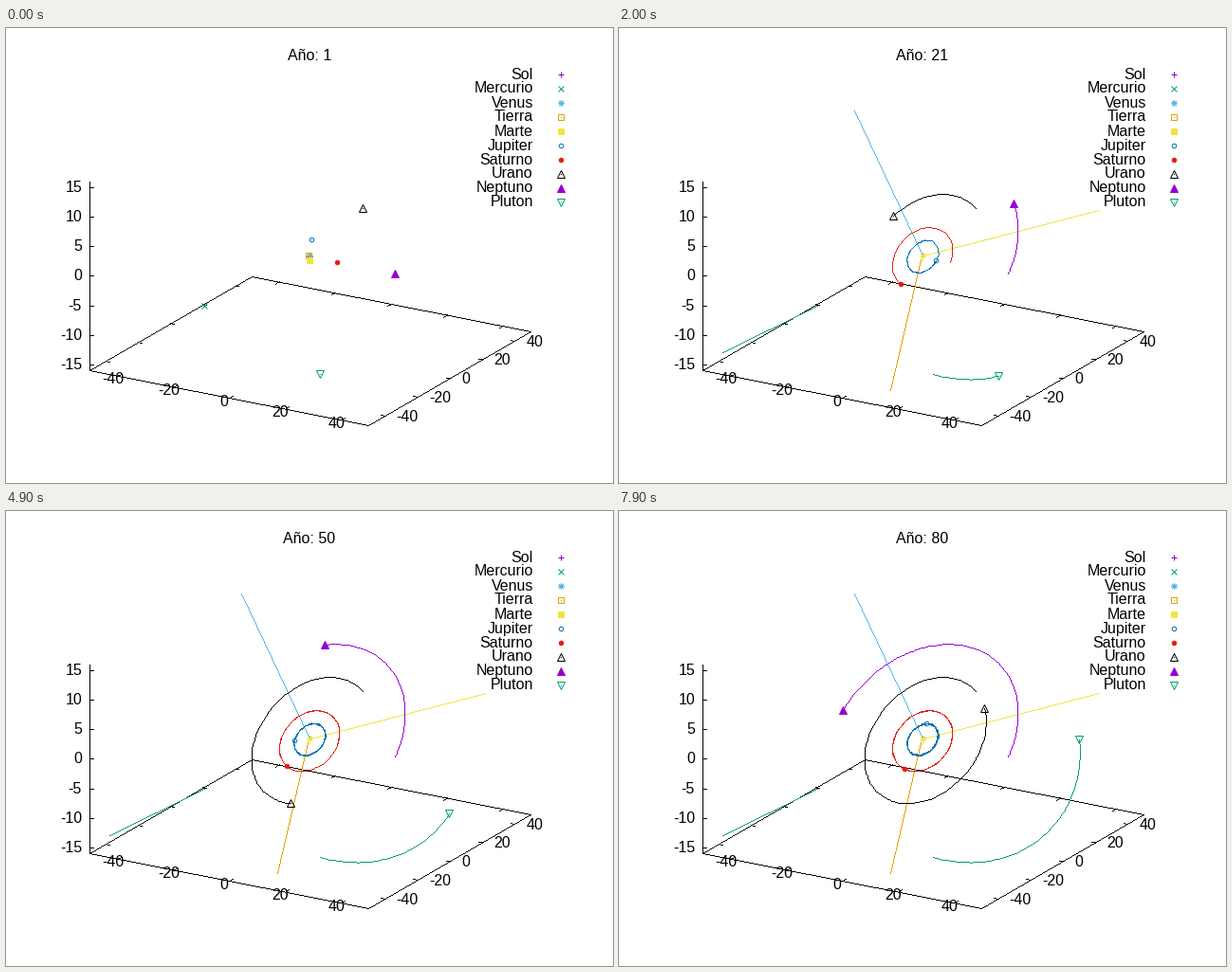
Write a matplotlib script that moves like this. It is 640 by 480 pixels and loops after 8 s.

```python
import numpy as np
import matplotlib.pyplot as plt
from matplotlib.animation import FuncAnimation

W, H, DPI = 640, 480, 100
YEARS = 80
PX = 72 / DPI
CENTER = np.array([320.3, 240.7])
FLOOR = -16
# Offsets that centre a marker, or a one-pixel dot, on a whole pixel
MARK, DOT = np.array([-0.5, -0.5]), np.array([-0.5, 0.5])

plt.rcParams["font.family"] = "Liberation Sans"
fig = plt.figure(figsize=(W / DPI, H / DPI), dpi=DPI, facecolor="white")
ax = fig.add_axes([0, 0, 1, 1])
ax.set_xlim(-0.5, W - 0.5)
ax.set_ylim(H - 0.5, -0.5)
ax.axis("off")


def project(x, y, z):
    """Orthographic view of the 3D box, in pixels."""
    sx = CENTER[0] + 2.945 * x + 1.71 * y
    sy = CENTER[1] + 0.58 * x - 0.995 * y - 6.23 * z
    return np.array([sx, sy])


def trace(points):
    """Hard-edged pixels along a polyline, and their count at each vertex."""
    pts = np.round(points)
    runs = [pts[:1]]
    for p, q in zip(pts[:-1], pts[1:]):
        n = int(np.abs(q - p).max())
        runs.append(np.round(np.linspace(p, q, n + 1)[1:]))
    return np.vstack(runs) + DOT, np.cumsum([len(r) for r in runs])


def dots(xy, color="black"):
    return ax.plot(*xy.T, ",", color=color)[0]


def line(*points):
    dots(trace(points)[0])


def label(x, y, s, ha):
    return ax.text(x, y, s, ha=ha, va="baseline", size=16 * PX, color="black")


def orbit(a, decay, e, incl, node, peri, lon, rate, accel):
    """Yearly screen positions of a Kepler orbit, seen in equatorial axes."""
    t = np.arange(YEARS)
    node, incl = np.radians([node, incl])
    m = np.radians(lon + rate * t + accel * t**2 - peri)
    ecc = m + e * np.sin(m)
    for _ in range(6):
        ecc -= (ecc - e * np.sin(ecc) - m) / (1 - e * np.cos(ecc))
    r = (a - decay * t) * (1 - e * np.cos(ecc))
    nu = 2 * np.arctan2(np.sqrt(1 + e) * np.sin(ecc / 2),
                        np.sqrt(1 - e) * np.cos(ecc / 2))
    u = nu + np.radians(peri) - node
    p, q = r * np.cos(u), r * np.sin(u) * np.cos(incl)
    x = p * np.cos(node) - q * np.sin(node)
    y = p * np.sin(node) + q * np.cos(node)
    z = r * np.sin(u) * np.sin(incl)
    tilt = np.radians(23.44)
    return project(x, y * np.cos(tilt) - z * np.sin(tilt),
                   y * np.sin(tilt) + z * np.cos(tilt)).T


def escape(points, exit_point):
    """Path of a body that leaves the box after its last listed point."""
    return np.vstack([points, [exit_point]])


# Box base and vertical axis
corners = [(-50, -50), (50, -50), (50, 50), (-50, 50), (-50, -50)]
line(*[project(x, y, FLOOR) for x, y in corners])
line(project(-50, -50, FLOOR), project(-50, -50, 16))


def tick(p, dx, dy):
    line(p, p + [dx, dy])


for v in range(-40, 41, 20):
    front, back = project(v, -50, FLOOR), project(v, 50, FLOOR)
    left, right = project(-50, v, FLOOR), project(50, v, FLOOR)
    tick(front, 4, -2.3)
    tick(back, -4, 2.3)
    tick(left, 4, 0.8)
    tick(right, -4, -0.8)
    label(front[0] - 5, front[1] + 8, str(v), "center")
    label(right[0] + 12, right[1] + 5.5, str(v), "left")

for v in range(-15, 16, 5):
    p = project(-50, -50, v)
    tick(p, 4, 0)
    label(79.5, p[1] + 4.5, str(v), "right")

# Mars spirals in before it is thrown out
k = np.arange(11)
swirl = np.radians(95 + 200 * k)
mars = CENTER + (4 * (1 - k / 14) * [np.cos(swirl), np.sin(swirl)]).T

PURPLE, GREEN, SKY, ORANGE = "#9400d3", "#009e73", "#56b4e9", "#e69f00"
YELLOW, BLUE, RED = "#f0e442", "#0072b2", "#e51e10"
ASTERISK = (8, 2, 0)

# name, colour, marker, size, filled, path
BODIES = [
    ("Sol", PURPLE, "+", 6, False, np.tile(CENTER, (YEARS, 1))),
    ("Mercurio", GREEN, "x", 6, False, escape([(209, 293)], (109, 342))),
    ("Venus", SKY, ASTERISK, 7, False, escape([(319.5, 240)], (247.5, 87))),
    ("Tierra", ORANGE, "s", 6, False, escape([(319, 239.5)], (286.5, 382))),
    ("Marte", YELLOW, "s", 6, True, escape(mars, (505.5, 191.5))),
    ("Jupiter", BLUE, "o", 4.5, False,
     orbit(5.08, 0.003, 0.03, 1.30, 100.5, 14.7, 107.5, 30.05, 0.0227)),
    ("Saturno", RED, "o", 4.5, True,
     orbit(9.48, 0.001, 0.05, 2.49, 113.7, 92.6, 7.4, 12.24, 0.0011)),
    ("Urano", "black", "^", 8, False,
     orbit(19.19, 0, 0.0473, 0.77, 74.0, 170.95, 65.0, 4.2848, 0)),
    ("Neptuno", PURPLE, "^", 8, True,
     orbit(30.07, 0, 0.0086, 1.77, 131.8, 44.96, 2.3, 2.168, 0)),
    ("Pluton", GREEN, "v", 8, False,
     orbit(39.48, 0, 0.2488, 17.14, 110.3, 224.07, 276.3, 1.4521, 0)),
]


def symbol(color, marker, size, filled):
    """Point symbol; open squares and triangles carry a centre dot."""
    mark = ax.plot([], [], marker=marker, ms=size * PX, mew=PX, ls="none",
                   color=color, mfc=color if filled else "none")[0]
    parts = [(mark, MARK)]
    if not filled and marker in ("s", "^", "v"):
        parts.append((dots(np.empty((0, 2)), color), DOT))
    return parts


def place(parts, xy):
    for part, shift in parts:
        part.set_data(*(np.round(xy) + shift).reshape(2, 1))


movers = []
for row, (name, color, marker, size, filled, path) in enumerate(BODIES):
    label(555.3, 53 + 15 * row, name, "right")
    place(symbol(color, marker, size, filled), (585, 49 + 15 * row))
    pixels, counts = trace(path)
    trail = dots(pixels[:1], color)
    movers.append((path, pixels, counts, trail,
                   symbol(color, marker, size, filled)))

title = label(319.3, 33, "", "center")


def update(i):
    title.set_text(f"Año: {i + 1}")
    artists = [title]
    for path, pixels, counts, trail, parts in movers:
        last = len(path) - 1
        now = min(i, last)
        trail.set_data(*pixels[:counts[now]].T)
        place(parts, path[now])
        inside = len(path) == YEARS or i < last
        for part, _ in parts:
            part.set_visible(inside)
            artists.append(part)
        artists.append(trail)
    return artists


anim = FuncAnimation(fig, update, frames=YEARS, interval=100,
                     repeat=True, repeat_delay=0, blit=False)
plt.show()
```
